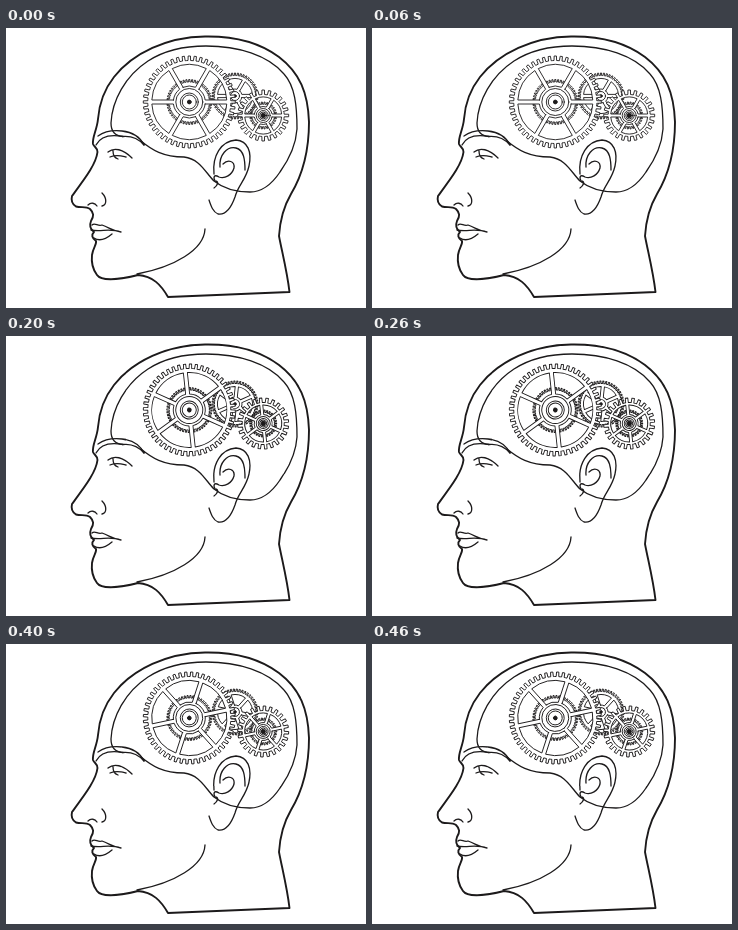
Write an HTML page that moves like this. It is 360 by 280 pixels and loops after 0.5 s.

```html
<!DOCTYPE html>
<html lang="en">
<head>
<meta charset="utf-8">
<title>Thinking gears</title>
<style>
  html, body { margin: 0; width: 100%; height: 100%; overflow: hidden; background: #fff; }
  svg { display: block; width: 360px; height: 280px; }
  path, circle { fill: none; stroke: #1c1a1b; stroke-linecap: round; stroke-linejoin: round; }
  .head { stroke-width: 1.9; }
  .line { stroke-width: 1.3; }
  .gear * { fill: #fff; fill-rule: evenodd; stroke-width: .9; }
  .gear .dot { fill: #1c1a1b; }
</style>
</head>
<body>
<svg viewBox="0 0 360 280">
  <path class="head" d="M162 269L283.500 264C281 243 276 224 273 208C274 192 278 178 285 166
    C297 146 303 120 303 94C302 65 294 45 273 29C253 14 228 8 199 8.500
    C161 9 127 25 108 49C97 63 93 78 92 91C91 102 86 109 87 116C88 119 92 120 91.500 124
    C90 136 80 149 66 168C65 172 66 176 70 178.500C75 180 80 178 84 181C88 185 88 188 85 193
    C83 198 84 201 88 204C85 207 86 210 90 213C91 216 87 220 86 227
    C85 236 88 243 91 247C95 253 112 252 132 247C147 248 155 257 162 269Z"/>
  <g class="line">
    <path d="M138 117C132 110 124 108 117 108.500C108 108 105 103 105 95C106 73 119 48 142 33
      C159 22 180 18 200 18C232 18 262 27 278 46C289 58 291 78 291 101C290 116 284 130 274 144
      C266 156 257 164 244 164C231 164 218 161 208 153C199 144 194 131 178 129
      C157 129 146 122 135 113"/>
    <path d="M92 108C99 103 107 102 116 103C126 104 134 109 138 117M90 117C94 109 103 106 117 108.500"/>
    <path d="M102 124C108 119 117 121 126 130M104 129C111 126 116 128 120 129M107 123C107 127 109 130 112 131"/>
    <path d="M96 165C101 170 101 177 96 178M82 177C85 174 89 175 91 178"/>
    <path d="M86 197C89 194 92 199 96 197C104 200 107 203 115 204M85 202C95 204 104 200 115 204
      M88 210C94 214 100 211 106 206"/>
    <path d="M199 201C198 222 168 239 131 246"/>
    <path d="M208 146C206 128 215 113 230 112C242 113 246 124 243 138C240 152 232 157 229 169
      C224 183 218 187 212 186C207 184 205 178 203 172"/>
    <path d="M214 139C213 127 221 118 230 120C238 122 239 132 239 142
      M217 136C222 131 229 133 228 140C226 147 219 151 213 149C208 146 207 149 209 153C214 153 211 158 208 160"/>
  </g>
</svg>
<script>
const svg = document.querySelector('svg');

function add(parent, tag, attrs) {
  const el = document.createElementNS(svg.namespaceURI, tag);
  for (const key in attrs) el.setAttribute(key, attrs[key]);
  parent.append(el);
  return el;
}

const point = (r, a) => (r * Math.cos(a)).toFixed(2) + ' ' + (r * Math.sin(a)).toFixed(2);

function toothed(outer, root, count) {
  const pitch = 2 * Math.PI / count;
  const shape = [[root, -.5], [root, -.24], [outer, -.19], [outer, .19], [root, .24]];
  let d = '';
  for (let i = 0; i < count; i++)
    for (const [r, f] of shape) d += (d ? 'L' : 'M') + point(r, (i + f) * pitch);
  return d + 'Z';
}

// Six openings, leaving parallel-sided spokes between them.
function openings(inner, outer, half) {
  let d = '';
  for (let i = 0; i < 6; i++) {
    const edge = (r, side) => point(r, (i + side) * Math.PI / 3 + (side ? -1 : 1) * Math.asin(half / r));
    d += `M${edge(inner, 0)}L${edge(outer, 0)}A${outer} ${outer} 0 0 1 ${edge(outer, 1)}` +
      `L${edge(inner, 1)}A${inner} ${inner} 0 0 0 ${edge(inner, 0)}Z`;
  }
  return d;
}

function gear({ x, y, teeth, rim, cog, rings, spoke, dot, turn }) {
  const g = add(svg, 'g', { class: 'gear' });
  if (cog) add(g, 'path', { d: toothed(...cog) });
  add(g, 'path', { d: toothed(...teeth) + openings(rings[0], rim, spoke) });
  for (const r of rings.slice(1)) add(g, 'circle', { r });
  add(g, 'circle', { r: dot, class: 'dot' });
  return angle => g.setAttribute('transform', `translate(${x} ${y}) rotate(${turn * angle})`);
}

const gears = [
  { x: 229, y: 68, teeth: [23, 20.5, 48], rim: 17.5, rings: [7, 4.5], spoke: 1.6, dot: 1.3, turn: -1 },
  { x: 183.3, y: 74, teeth: [46, 41.5, 48], rim: 37.5, cog: [22.5, 20, 48],
    rings: [16, 13.5, 9, 7], spoke: 2, dot: 1.9, turn: 1 },
  { x: 257.2, y: 87.5, teeth: [25.5, 21, 24], rim: 18.5, cog: [13.5, 11.2, 30],
    rings: [9, 7, 5, 3.5], spoke: 1.5, dot: 2.2, turn: 1 }
].map(gear);

function draw(now) {
  const step = Math.floor(now % 500 / 100);
  gears.forEach(rotate => rotate(step * 12));
  requestAnimationFrame(draw);
}
draw(performance.now());
</script>
</body>
</html>
```
